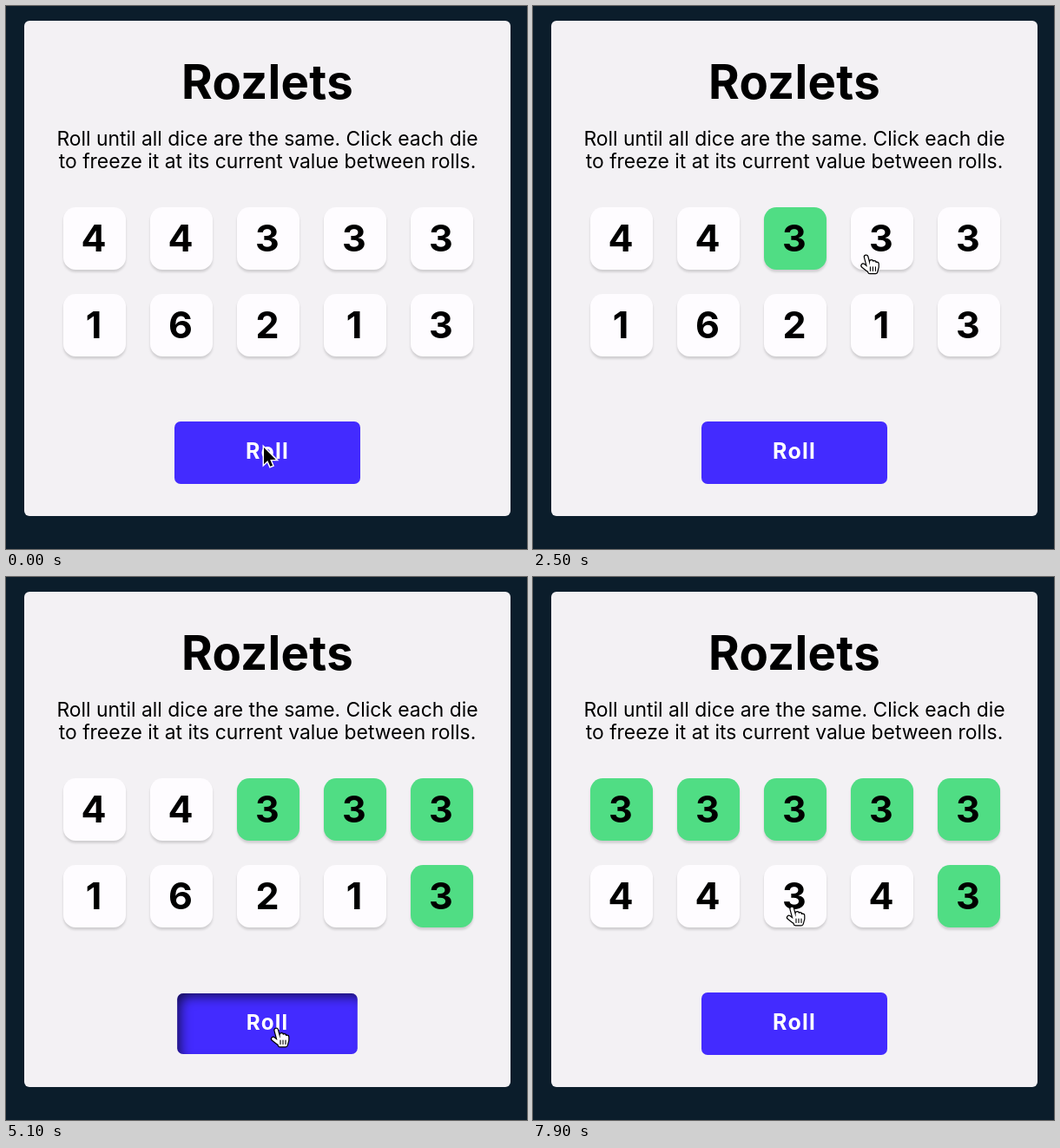
An HTML page that plays this animation: 600 px wide and 626 px high, repeating every 8 s.

```html
<!DOCTYPE html>
<html lang="en">
<head>
<meta charset="utf-8">
<style>
  html, body { margin: 0; width: 100%; height: 100%; overflow: hidden; background: #0b1d2b; }
  body { position: relative; font-family: Inter, sans-serif; color: #000; }
  body > * { position: absolute; box-sizing: border-box; margin: 0; text-align: center; }
  main { left: 21px; top: 17px; width: 560px; height: 571px; border-radius: 6px; background: #f3f1f4; }
  h1 { left: 21px; top: 57px; width: 560px; font: 700 54.5px/60px Inter, sans-serif; letter-spacing: .3px; }
  p { left: 21px; top: 140px; width: 560px; font-size: 22.86px; line-height: 26px; }
  .die {
    width: 72px; height: 72px; padding-right: 2px; border-radius: 14.3px; background: #fefcff;
    box-shadow: 0 2.8px 2.8px rgba(0, 0, 0, .15); font-size: 43px; line-height: 70px; font-weight: 700;
  }
  .die.held { background: #50dd84; }
  #roll {
    left: 194px; top: 479px; width: 214px; height: 72px; border-radius: 7px;
    background: #432bff; color: #fff; font-size: 25px; line-height: 69px; font-weight: 700; letter-spacing: 1.2px;
  }
  #roll.pressed { transform: scale(.97); box-shadow: inset 7px 7px 14px -4px rgba(0, 0, 0, .7); }
  svg { left: 0; top: 0; width: 1px; height: 1px; overflow: visible; }
</style>
</head>
<body>
<main></main>
<h1>Rozlets</h1>
<p>Roll until all dice are the same. Click each die<br>to freeze it at its current value between rolls.</p>
<div id="roll">Roll</div>
<svg id="cursor">
  <path id="arrow" transform="scale(1.2)" stroke="#fff" stroke-width="2.4" paint-order="stroke"
    d="M0 0V16L3.6 12.6 6.1 18.2 8.4 17.2 6 11.6H11.5Z"/>
  <g id="hand" stroke-linecap="round" stroke-linejoin="round">
    <path id="fingers" stroke="#000" stroke-width="5.8"
      d="M2.2 2.5 5 13M8.3 8V13M11.5 9V13M14.5 10.5V14M-1.2 12.5 4.5 17M5 13 14.5 14 13 19.5H6.5Z"/>
    <path id="skin" fill="#fff" stroke="#fff" stroke-width="3.4"/>
    <path stroke="#000" stroke-width="1.1" d="M7 14V18.5M10 14V18.5M13 14V18.5"/>
  </g>
</svg>
<script>
const LOOP = 8000, STEP = 100, CLICK = 200;
const throws = ["4433316213", "3333344343"];
// cursor stops: arrival time, x, y; every stop ends in a click
const stops = [
  [-CLICK, 297, 509], [700, 101, 386], [1900, 281, 283], [2550, 385, 287], [3200, 483, 288],
  [3900, 498, 360], [5000, 309, 520], [6100, 209, 295], [6800, 110, 290], [7800, 296, 380]
];
const $ = id => document.getElementById(id);
const cursor = $("cursor"), roll = $("roll");
$("skin").setAttribute("d", $("fingers").getAttribute("d"));

const dice = [...throws[0]].map((_, i) => {
  const el = document.createElement("div");
  el.className = "die";
  el.style.left = 66 + i % 5 * 100 + "px";
  el.style.top = 232 + Math.floor(i / 5) * 100 + "px";
  document.body.insertBefore(el, cursor);
  return el;
});

const over = (el, x, y) =>
  x >= el.offsetLeft && x <= el.offsetLeft + el.offsetWidth &&
  y >= el.offsetTop && y <= el.offsetTop + el.offsetHeight;

// replay the clicks made so far: the button rolls, a three is kept
function gameAt(t) {
  const held = new Set();
  let turn = -1, pressed = false;
  for (const [at, x, y] of stops) {
    const onRoll = over(roll, x, y);
    if (t < at + CLICK) {
      pressed = onRoll && t >= at;
      break;
    }
    if (onRoll) turn++;
    const i = dice.findIndex(el => over(el, x, y));
    if (i >= 0 && throws[turn][i] === "3") held.add(i);
  }
  return { held, pressed, values: throws[turn] };
}

function cursorAt(t) {
  const i = stops.findLastIndex(s => s[0] <= t);
  const [at, x, y] = stops[i];
  const [nextAt, nextX, nextY] = stops[i + 1] || [LOOP, x, y];
  const k = Math.max(0, (t - at - CLICK) / (nextAt - at - CLICK));
  const ease = k * k * (3 - 2 * k);
  return [x + (nextX - x) * ease, y + (nextY - y) * ease];
}

function draw(now) {
  const t = Math.floor(now % LOOP / STEP) * STEP;
  const game = gameAt(t), [x, y] = cursorAt(t);
  dice.forEach((el, i) => {
    el.textContent = game.values[i];
    el.classList.toggle("held", game.held.has(i));
  });
  roll.classList.toggle("pressed", game.pressed);
  const hand = t >= CLICK && [roll, ...dice].some(el => over(el, x, y));
  cursor.style.transform = `translate(${x}px, ${y}px)`;
  $("hand").style.display = hand ? "" : "none";
  $("arrow").style.display = hand ? "none" : "";
  requestAnimationFrame(draw);
}
draw(0);
</script>
</body>
</html>
```
